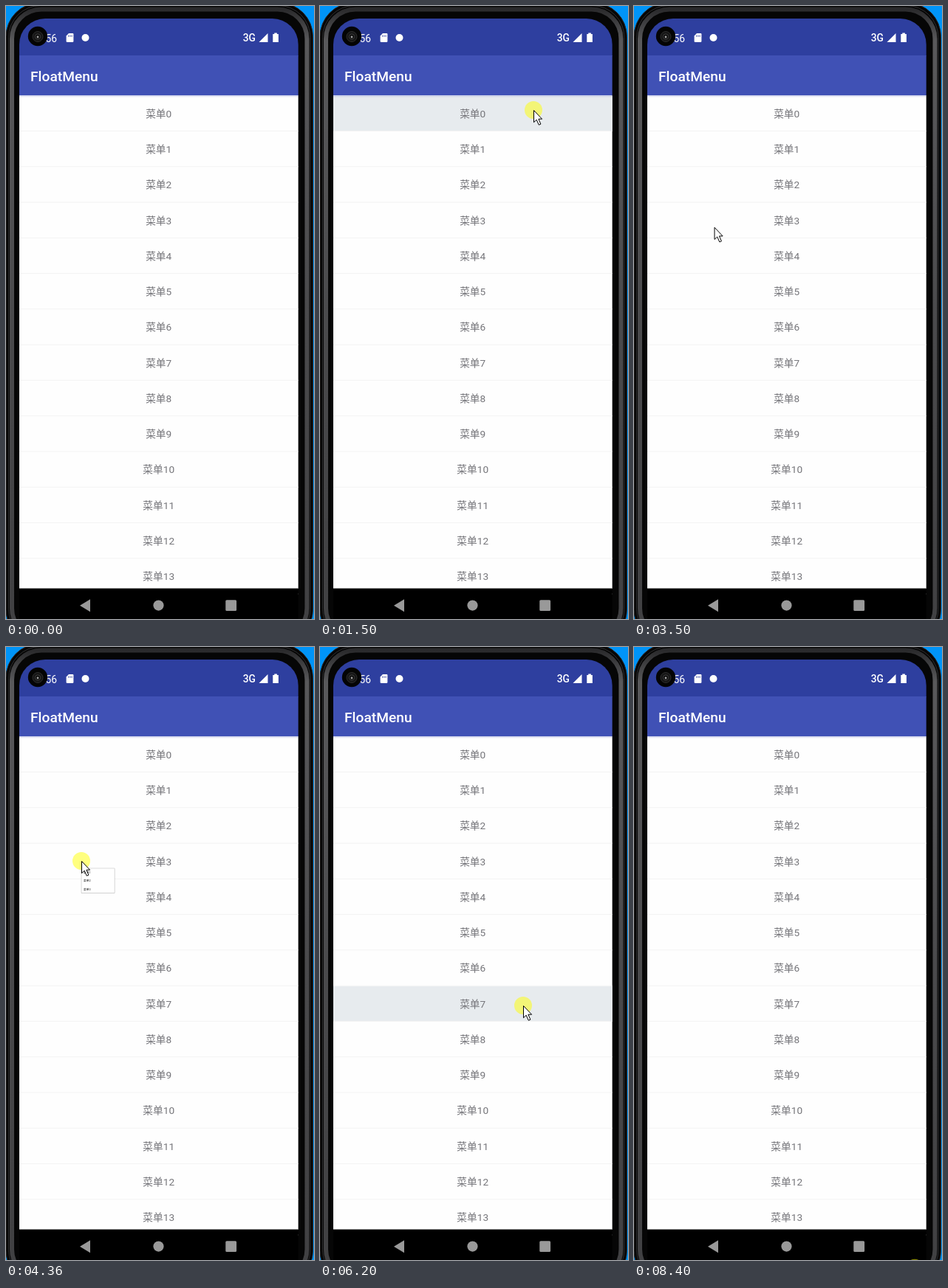
Animation of 417x831 px, one loop 8.53 s. Source, as an HTML page:

```html
<!DOCTYPE html>
<html lang="zh">
<head>
<meta charset="utf-8">
<title>FloatMenu</title>
<style>
  html, body { margin: 0; width: 100%; height: 100%; overflow: hidden; background: #0094f8; }
  svg { display: block; width: 100%; height: 100%; }
  text { font-family: Roboto, "Noto Sans CJK SC", "Noto Sans CJK", sans-serif; }
  .title { font-size: 19.2px; font-weight: 500; fill: #fff; }
  .status { font-size: 13.8px; fill: #fff; }
  .network { font-weight: 500; }
  .item { font-size: 13.7px; fill: #75757a; text-anchor: middle; }
  .option { font-size: 14.2px; fill: #111; }
  .panel {
    fill: #fff; stroke: #000; stroke-opacity: .12; vector-effect: non-scaling-stroke;
    filter: drop-shadow(0 .5px 2px rgba(0, 0, 0, .4));
  }
</style>
</head>
<body>
<svg viewBox="0 0 417 831" preserveAspectRatio="none">
  <defs>
    <linearGradient id="rim" x1="0" y1="0" x2="0" y2="1">
      <stop offset="0" stop-color="#2a2a2c"/>
      <stop offset=".05" stop-color="#59595b"/>
      <stop offset=".5" stop-color="#4a4a4c"/>
      <stop offset="1" stop-color="#404042"/>
    </linearGradient>
    <linearGradient id="shade" x1="0" y1="0" x2="0" y2="1">
      <stop offset="0" stop-color="#3f51b5" stop-opacity=".28"/>
      <stop offset="1" stop-color="#3f51b5" stop-opacity="0"/>
    </linearGradient>
    <clipPath id="screen"><rect x="18" y="17" width="377.7" height="850" rx="35"/></clipPath>
  </defs>

  <!-- phone body -->
  <rect x="0" y="-4.5" width="415.5" height="869" rx="46" fill="#060606" stroke="#2b2522"/>
  <g fill="none">
    <rect x="8" y="4.5" width="399.5" height="852" rx="40" stroke="url(#rim)" stroke-width="6"/>
    <rect x="3.5" y="-.5" width="408.5" height="861" rx="43" stroke="#4c4c4e" stroke-opacity=".6"/>
  </g>

  <g clip-path="url(#screen)">
    <rect x="18" y="16" width="378" height="52" fill="#2e3f9f"/>
    <rect x="18" y="67" width="378" height="54" fill="#4051b5"/>
    <rect x="18" y="121" width="378" height="669" fill="#fefefe"/>
    <rect id="pressed" x="18" width="378" height="47.5" fill="#e7ebee"/>
    <g id="list"></g>
    <rect x="18" y="121" width="378" height="3" fill="url(#shade)"/>
    <rect x="18" y="789.5" width="378" height="80" fill="#000"/>
  </g>

  <text class="title" x="33" y="102">FloatMenu</text>
  <text class="status" x="53.5" y="48.5">56</text>
  <text class="status network" x="320.7" y="48.3">3G</text>
  <g fill="#fff">
    <path d="M85 37h5.2q1.2 0 1.2 1.2v9.6q0 1.2-1.2 1.2h-7.4q-1.2 0-1.2-1.2v-7.4z"/>
    <circle cx="107.5" cy="43" r="5"/>
    <path d="M354.5 37v12H342.5z"/>
    <path d="M363.3 38v-1.5h3.6V38h2v11h-7.6V38z"/>
  </g>
  <path d="M84.7 39.5v2.3m2.2-2.3v2.3m2.2-2.3v2.3" stroke="#2e3f9f" stroke-width=".9"/>

  <!-- camera -->
  <circle cx="43" cy="41" r="13.2" fill="#040404"/>
  <circle cx="43" cy="41.5" r="7" fill="#161616" stroke="#2d2d2d"/>
  <circle cx="43" cy="41.5" r="3.6" fill="#0a0a0a" stroke="#4a4a4a" stroke-width=".8"/>
  <circle cx="43" cy="42" r="1.4" fill="#a5a5a5"/>

  <!-- navigation -->
  <g fill="#999">
    <path d="M100 812.8L114 804.3v17z"/>
    <circle cx="206.5" cy="812.6" r="7.1"/>
    <rect x="297.3" y="805.3" width="14.8" height="14.8" rx="1.5"/>
  </g>

  <g id="menu">
    <rect class="panel" width="173.5" height="129.5" rx="1"/>
    <text class="option" x="11.8" y="28.2">菜单1</text>
    <text class="option" x="11.8" y="70.9">菜单2</text>
    <text class="option" x="11.8" y="113.6">菜单3</text>
  </g>

  <g id="pointer">
    <circle id="disc" r="12" fill="#ff0" fill-opacity=".5"/>
    <path d="M.5.5V16.7L4.2 13.2 7.3 20.2 9.9 19.1 6.9 12.2H11.6z" fill="#fff" stroke="#000"/>
  </g>
</svg>
<script>
const LOOP = 8530, START = 70, PITCH = 48.27, TOP = 122;
const $ = id => document.getElementById(id);
const ease = p => p * p * (3 - 2 * p);

// pointer moves: first step, last step, number of steps, end point
const moves = [
  [140, 880, 11, 282, 145], [950, 1220, 4, 289, 141],
  [2770, 3030, 5, 135, 339], [3170, 3630, 7, 102, 290],
  [5100, 5510, 7, 221, 479], [5580, 5790, 4, 262, 483], [5860, 6000, 3, 275, 486],
  [7390, 7860, 8, 351, 801], [7930, 8070, 3, 360, 834], [8140, 8140, 1, 380, 841.7]
];
const presses = [
  [1290, 2430], [2630, 2770], [3700, 4770], [4970, 5100],
  [6000, 7060], [7250, 7390], [8400, LOOP]
];
// px, py: the corner each menu grows from
const menus = [
  { row: 0, hold: 1500, open: 2030, full: 2240, steps: 4, close: 2700, x: 107.5, y: 156.5, px: 289, py: 148.5 },
  { row: 3, hold: 3900, open: 4360, full: 4510, steps: 3, close: 5040, x: 108, y: 306, px: 100, py: 298 },
  { row: 7, hold: 6200, open: 6670, full: 6790, steps: 3, close: 7320, x: 92.5, y: 503.5, px: 274, py: 495.5 }
];

$("list").innerHTML = Array.from({ length: 14 }, (_, i) => {
  const y = TOP + i * PITCH;
  return `<text class="item" x="206.7" y="${y + 28.7}">菜单${i}</text>` +
    `<rect x="18" y="${y + 47}" width="378" height="1" fill="#f3f3f3"/>`;
}).join("");

// share of a stepped change that is done at time t
function progress(t, first, last, n) {
  if (t < first) return 0;
  if (t >= last) return 1;
  return (Math.floor((t - first) / (last - first) * (n - 1) + 1e-6) + 1) / n;
}

function pointerAt(t) {
  let x = 371, y = 695;
  for (const [first, last, n, toX, toY] of moves) {
    const p = ease(progress(t, first, last, n));
    x += (toX - x) * p;
    y += (toY - y) * p;
  }
  return [x, y];
}

function show(el, on) { el.setAttribute("visibility", on ? "visible" : "hidden"); }

function draw(t) {
  const [x, y] = pointerAt(t);
  $("pointer").setAttribute("transform", `translate(${x} ${y})`);
  show($("pointer"), t >= START);
  show($("disc"), t >= START && presses.some(([down, up]) => t >= down && t < up));

  const held = menus.find(m => t >= m.hold && t < m.open);
  show($("pressed"), held);
  if (held) $("pressed").setAttribute("y", TOP + held.row * PITCH);

  const m = menus.find(m => t >= m.open && t < m.close + 70);
  show($("menu"), m);
  if (m) {
    const closing = t >= m.close;
    const s = closing ? .5 : ease(progress(t, m.open, m.full, m.steps));
    $("menu").setAttribute("opacity", closing ? .5 : 1);
    $("menu").setAttribute("transform",
      `translate(${m.px} ${m.py}) scale(${s}) translate(${m.x - m.px} ${m.y - m.py})`);
  }
}

const begin = performance.now();
function tick() {
  draw((performance.now() - begin) % LOOP);
  requestAnimationFrame(tick);
}
tick();
</script>
</body>
</html>
```
